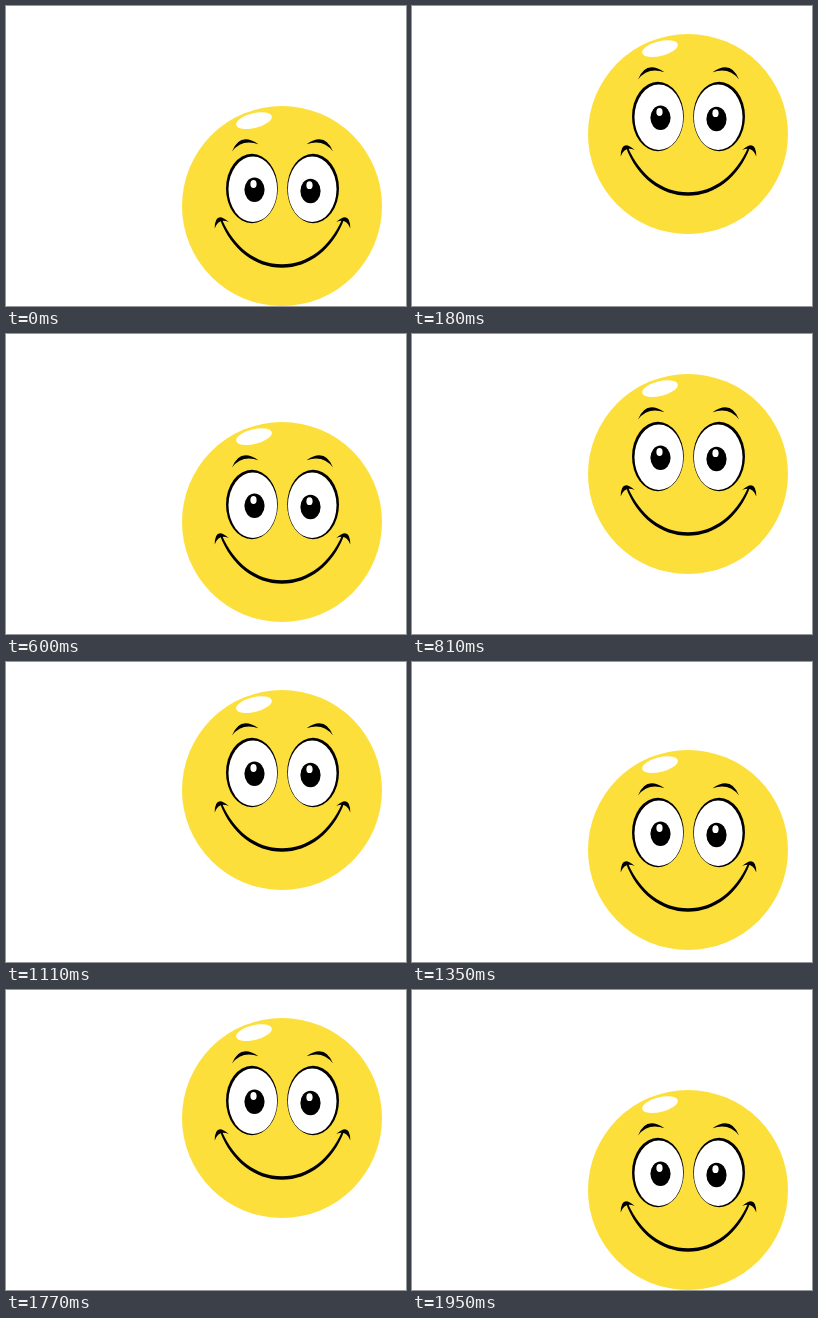
Recreate the animation shown at these times as an HTML page. Size 400 by 300 pixels, loop 1980 ms.

```html
<!DOCTYPE html>
<html lang="en">
<head>
<meta charset="utf-8">
<title>Bouncing smiley</title>
<style>
  html, body { margin: 0; width: 100%; height: 100%; overflow: hidden; background: #fff; }
  svg { display: block; width: 400px; height: 300px; }
</style>
</head>
<body>
<svg viewBox="0 0 400 300">
  <g id="ball">
    <circle cx="276" cy="100" r="100" fill="#fddf3c"/>
    <ellipse rx="18.3" ry="7.4" fill="#fff" transform="translate(248 14.6) rotate(-14)"/>

    <!-- eye outline, brow and cheek, mirrored for the right side -->
    <g id="side">
      <ellipse cx="245.9" cy="82.5" rx="25.9" ry="34.7"/>
      <ellipse cx="246.8" cy="83.3" rx="24.3" ry="32.7" fill="#fff"/>
      <path d="M226 45.5Q234 25.5 252.5 38.3Q236 32.5 226 45.5Z"/>
      <path d="M208.7 122.5Q209 104 222.8 116Q212.5 111.5 208.7 122.5Z"/>
    </g>
    <use href="#side" transform="translate(553) scale(-1 1)"/>

    <g id="pupil">
      <ellipse cx="248.5" cy="83.8" rx="10.1" ry="12.2"/>
      <ellipse cx="247.5" cy="78" rx="3.1" ry="3.9" fill="#fff"/>
    </g>
    <use href="#pupil" x="56" y="1.2"/>

    <path d="M214 113.5C225 143 249 161.8 276 161.8S327 143 338 113.5L336 113.5C324 141 302 158.3 276 158.3S228 141 216 113.5Z"/>
  </g>
</svg>
<script>
  const STEP_MS = 30, STEPS = 22;
  const ball = document.getElementById('ball');

  // Top edge of the ball: fast near the floor, slower near the ceiling.
  const topAt = k => k < 7 ? 100 - 12 * k : 2 + Math.floor((10 - k) * 20 / 3);

  function draw() {
    const step = Math.floor(performance.now() / STEP_MS) % STEPS;
    const k = Math.min(step, STEPS - 1 - step);
    ball.setAttribute('transform', `translate(0 ${topAt(k)})`);
    requestAnimationFrame(draw);
  }
  draw();
</script>
</body>
</html>
```
